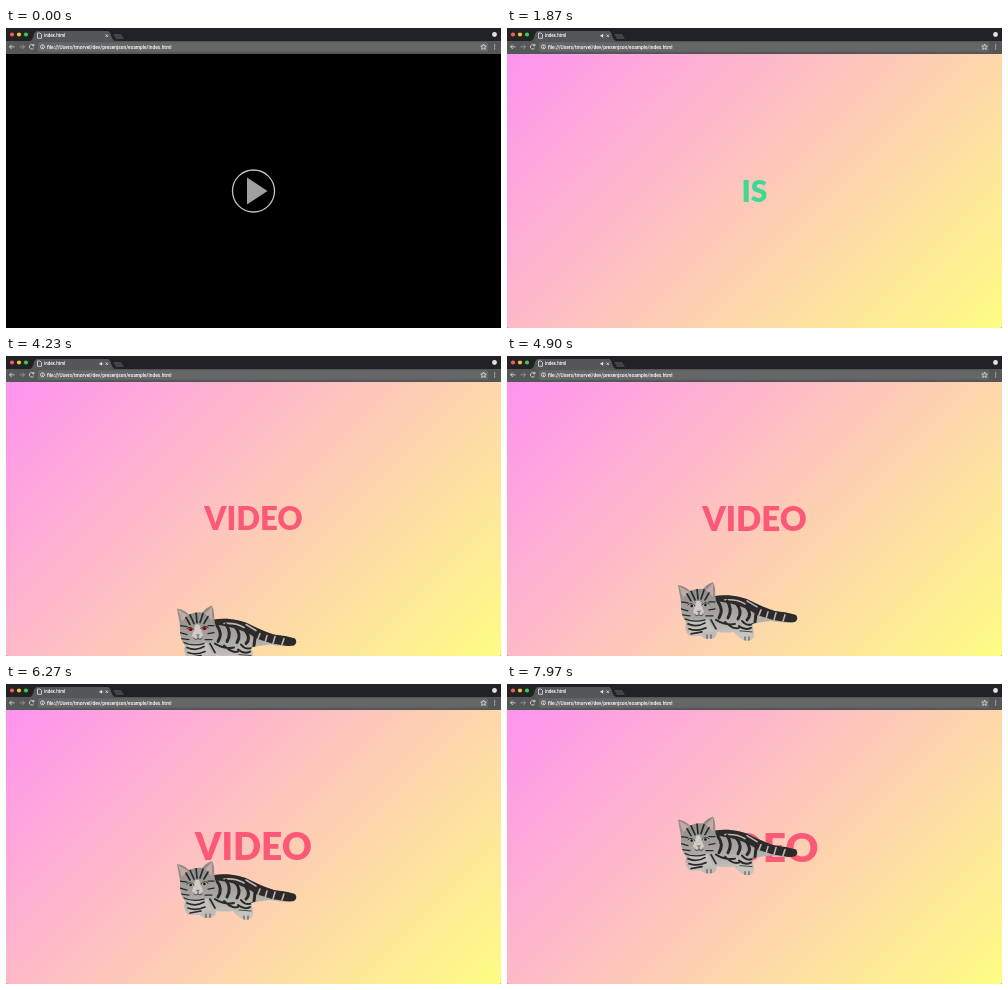
Animation of 495x300 px, one loop 8000 ms. Source, as an HTML page:

```html
<!DOCTYPE html>
<html lang="en">
<head>
<meta charset="utf-8">
<title>index.html</title>
<style>
  html, body { margin: 0; width: 100%; height: 100%; overflow: hidden; background: #000; }
  #stage { position: relative; width: 495px; height: 300px; overflow: hidden; }
  #page {
    position: absolute; inset: 25px 0 0; border-radius: 0 0 1px 1px;
    background: linear-gradient(135deg, #fe93f0, #fdfd83);
  }
  svg { position: absolute; inset: 0; }
  .ui { font-family: Roboto, sans-serif; font-weight: 500; fill: #fff; }
  #word { font-family: Lato, sans-serif; font-weight: 900; text-anchor: middle; }
  .line { fill: none; stroke: #e4e4e4; stroke-width: .8; }
  .stripe { fill: none; stroke: #2b2928; stroke-linecap: round; }
  .light { fill: none; stroke: #b9b5b1; stroke-linecap: round; }
</style>
</head>
<body>
<div id="stage">
  <div id="page"></div>
  <svg width="495" height="300" viewBox="0 0 495 300">
    <defs>
      <linearGradient id="fur" x1="0" y1="0" x2=".15" y2="1">
        <stop offset=".1" stop-color="#8d8a87"/>
        <stop offset=".6" stop-color="#a9a6a2"/>
        <stop offset="1" stop-color="#cbc8c4"/>
      </linearGradient>
      <path id="body" d="M4 20L1 3Q8 4 13 9Q20 6 26 7Q30 2 36 0Q39 6 38 14C50 12 66 14 76 20Q88 26 98 29Q110 30 119 33Q122 37 118 40Q108 42 94 39Q84 40 75 42Q77 46 77 51Q78 58 70 59Q63 58 57 50Q48 51 40 50Q40 57 32 57Q26 57 24 54L12 54Q7 48 9 40Q3 33 4 20Z"/>
      <clipPath id="inside"><use href="#body"/></clipPath>
    </defs>

    <g id="play">
      <circle cx="247.5" cy="163" r="21" fill="none" stroke="#c4c4c4" stroke-width="1.3"/>
      <path d="M241 149.5L261.5 163L241 176.5Z" fill="#a0a0a0"/>
    </g>

    <g id="show">
      <text id="word" x="247.5"></text>
      <g id="cat">
        <use href="#body" fill="url(#fur)"/>
        <g clip-path="url(#inside)">
          <!-- back, flank and tail -->
          <path d="M38 12Q60 10 78 20L100 29L122 32V42L96 38L80 33Q66 22 39 19Z" fill="#2d2a29"/>
          <path class="light" stroke-width="1.6" d="M48 18Q60 17 68 22M70 19L80 25M84 28L82 33M91 30L89 37M99 31L97 38M108 33L106 39"/>
          <path class="stripe" stroke-width="3" d="M41 20Q47 28 42 36M50 19Q56 27 51 36M59 21Q66 29 61 37M70 26Q75 33 70 38M79 32L78 40"/>
          <path class="stripe" stroke-width="2" d="M39 38Q49 44 58 42M48 40Q56 48 62 46M65 39Q70 45 76 42M62 44Q68 49 74 46"/>
          <!-- chest and paws -->
          <path d="M12 37Q24 43 31 37L36 49L24 53L12 54Z" fill="#c5c2bd"/>
          <path class="stripe" stroke-width="1.7" d="M11 42Q20 46 28 41M12 47Q20 50 29 46M34 38L39 47M14 52L25 50"/>
          <ellipse cx="32" cy="53.5" rx="7" ry="4" fill="#bfbbb7"/>
          <ellipse cx="70" cy="54.5" rx="7.5" ry="4.8" fill="#c8c5c0"/>
          <path class="stripe" stroke-width=".8" d="M30 53V57M34 53V57M68 55V59M72 55V59M63 49L75 50"/>
          <!-- head -->
          <path d="M2 4L6 16L12 10ZM36 1L29 8L36 15Z" fill="#c3aaa5"/>
          <path class="stripe" stroke-width="1.7" d="M14 9L18 18M20 7L21 17M27 8L24 17M10 12L14 19M32 11L28 18"/>
          <path class="stripe" stroke-width="1.3" d="M4 20L11 21M4 27L11 29M5 33L13 34M38 20L32 20M38 27L32 28M36 34L29 34M8 37Q17 41 28 38"/>
          <path d="M19.5 19L16 30Q21 37 27 30L23 19Z" fill="#cfcbc7"/>
        </g>
        <path class="stripe" stroke-width="1" d="M11 23Q14 20 18 24M25 23Q28 19 32 22"/>
        <g id="eyes">
          <ellipse cx="14.5" cy="24" rx="2.7" ry="1.8"/>
          <ellipse cx="28.5" cy="23" rx="2.7" ry="1.8"/>
        </g>
        <circle cx="14.7" cy="24" r="1.3" fill="#171717"/>
        <circle cx="28.4" cy="23" r="1.3" fill="#171717"/>
        <path d="M19.5 29L24 28.7L22 31Z" fill="#8e6865"/>
        <path class="stripe" stroke-width=".7" d="M22 31V33M18 33Q20 35 22 33Q24 35 26 33"/>
      </g>
    </g>

    <g id="browser">
      <path d="M0 0H495V13H0Z" fill="#202225"/>
      <path d="M0 13H495V26H0Z" fill="#555657"/>
      <path d="M24 13Q27 12 28 6Q29 3 31 3H101Q104 3 105 7Q106 12 109 13Z" fill="#555657"/>
      <path d="M107 6H115L118 11H110Z" fill="#424447"/>
      <rect x="32" y="14.2" width="450" height="9.6" rx="1.5" fill="#656667"/>
      <circle cx="6" cy="6.5" r="2.1" fill="#fc5b57"/>
      <circle cx="13" cy="6.5" r="2.1" fill="#f3bd3d"/>
      <circle cx="20" cy="6.5" r="2.1" fill="#43c550"/>
      <path class="line" stroke-width=".6" d="M31.5 5H34L35.5 6.5V10.3H31.5Z"/>
      <text class="ui" x="38" y="9.2" font-size="4.5">index.html</text>
      <path class="line" d="M99.5 6.5L102 9M102 6.5L99.5 9"/>
      <path id="audio" d="M93.5 7H94.5L96 5.8V9.8L94.5 8.6H93.5ZM96.7 6.7Q98 7.8 96.7 9Z" fill="#e4e4e4"/>
      <path class="line" d="M8.5 18.8H3.5M5.7 16.6L3.5 18.8L5.7 21"/>
      <path class="line" opacity=".5" d="M13.5 18.8H18.5M16.3 16.6L18.5 18.8L16.3 21"/>
      <path class="line" d="M27.5 17.3A2.3 2.3 0 1 0 27.8 19.8M28 15.8V17.8H26"/>
      <circle class="line" cx="36.5" cy="18.8" r="2"/>
      <path class="line" d="M36.5 18.5V20M36.5 17.3V17.8"/>
      <text class="ui" x="41" y="20.5" font-size="4.86">file:///Users/tmorvel/dev/presenjson/example/index.html</text>
      <path class="line" stroke-width=".7" d="M477.5 16.1L478.3 18L480.3 18.1L478.8 19.5L479.3 21.4L477.5 20.3L475.7 21.4L476.2 19.5L474.7 18.1L476.7 18Z"/>
      <g fill="#e4e4e4">
        <circle cx="488.7" cy="16.8" r=".6"/><circle cx="488.7" cy="18.8" r=".6"/><circle cx="488.7" cy="20.8" r=".6"/>
        <circle cx="488.5" cy="6.5" r="2.4"/>
      </g>
    </g>
  </svg>
</div>
<script>
  const LOOP = 8000, START = 500;
  const $ = id => document.getElementById(id);
  const word = $('word');

  const words = [
    { from: START, text: 'THIS', color: '#ff5b79', size: 30 },
    { from: 1700, text: 'IS', color: '#40d994', size: 30 },
    { from: 2700, text: 'A', color: '#128993' },
    { from: 3700, text: 'VIDEO', color: '#fc5976' }
  ];

  // Sine ease from -1 to 1 over eight seconds, shared by cat and growing words.
  function swell(t) {
    const p = Math.min(1, Math.max(0, (t - 1200) / 8000));
    return -Math.cos(Math.PI * p);
  }

  function draw(t) {
    const playing = t >= START;
    $('page').style.background = playing ? '' : '#000';
    $('play').style.display = playing ? 'none' : '';
    $('show').style.display = playing ? '' : 'none';
    $('audio').style.display = playing ? '' : 'none';
    if (!playing) return;

    const s = swell(t);
    const { text, color, size = 34 + 7.4 * s } = words.findLast(w => t >= w.from);
    word.textContent = text;
    word.setAttribute('fill', color);
    word.setAttribute('font-size', size);
    word.setAttribute('y', 163 + size * 0.36);

    $('cat').setAttribute('transform', `translate(170 ${215 - 93 * s})`);
    $('eyes').setAttribute('fill', t < 4900 ? '#f52c3c' : '#aaa795');
  }

  function tick() {
    draw(performance.now() % LOOP);
    requestAnimationFrame(tick);
  }
  tick();
</script>
</body>
</html>
```
